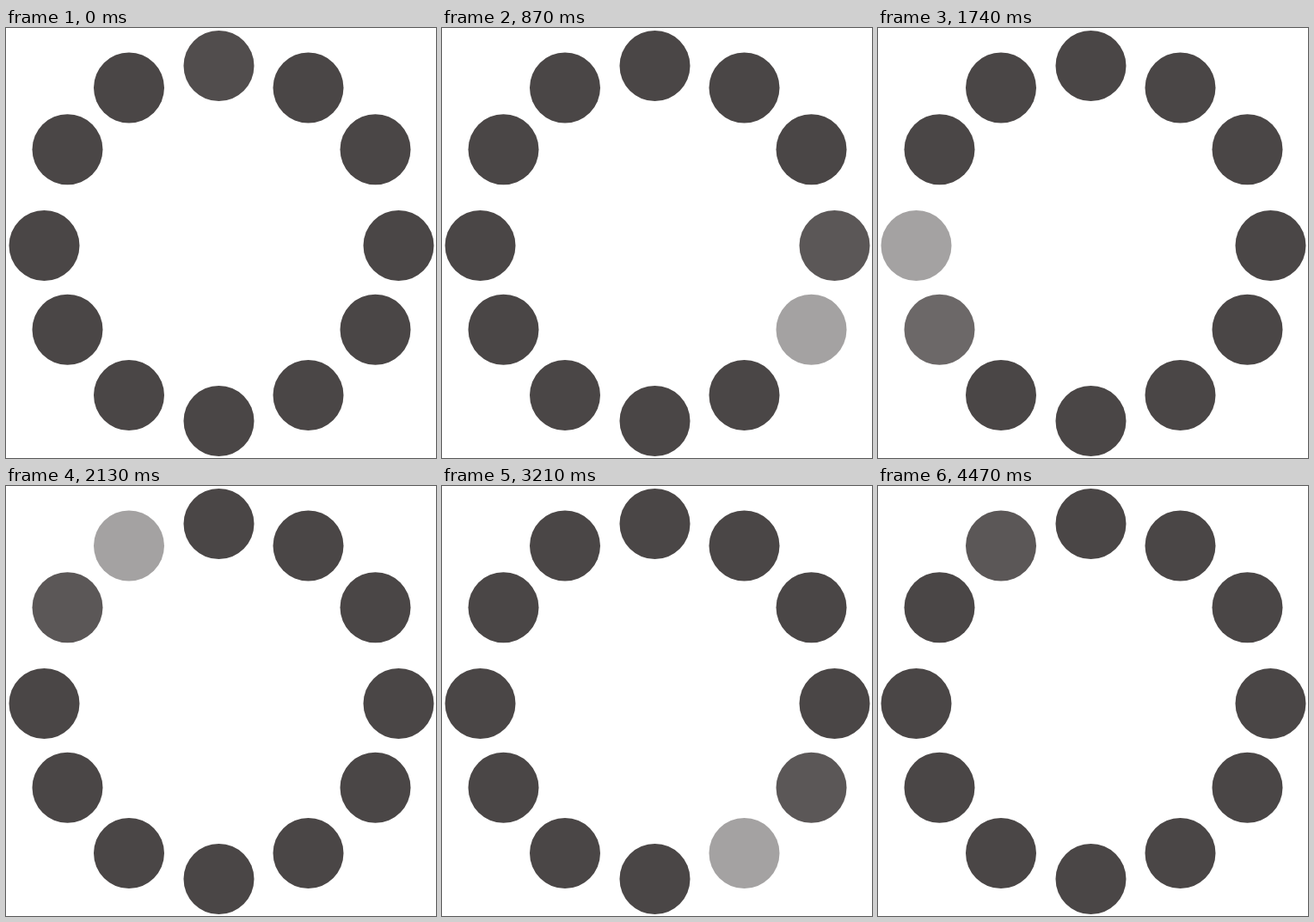
An HTML page for the animation above (4500 ms loop, 500 px wide and 500 px high).

```html
<!DOCTYPE html>
<html>
<head>
<meta charset="utf-8">
<style>
html, body { margin: 0; width: 100%; height: 100%; overflow: hidden; background: #fff; }
svg { display: block; width: 500px; height: 500px; fill: #4a4646; }
</style>
</head>
<body>
<svg id="ring" viewBox="0 0 500 500"></svg>
<script>
const LOOP = 4500, TICK = 30, COUNT = 12, LAG = 5, FADE = .19;

// One quarter of the ring, mirrored about each point's own middle.
const quarter = [
  { cx: 247.5, cy: 250.5, dx: 0, dy: 206.5 },
  { cx: 247.25, cy: 248.25, dx: 104.25, dy: 178.75 },
  { cx: 250.5, cy: 246, dx: 179, dy: 104.75 },
  { cx: 250.5, cy: 253, dx: 206, dy: 0 }
];

const ring = document.getElementById('ring');
const dots = Array.from({ length: COUNT }, (_, i) => {
  const { cx, cy, dx, dy } = quarter[Math.min(i % 6, 6 - i % 6)];
  const dot = document.createElementNS('http://www.w3.org/2000/svg', 'circle');
  dot.setAttribute('cx', i < 6 ? cx + dx : cx - dx);
  dot.setAttribute('cy', i < 3 || i > 9 ? cy - dy : cy + dy);
  dot.setAttribute('r', 41);
  return ring.appendChild(dot);
});

// Fade to half, hold, then return at half the speed.
function pulse(step, start) {
  const fadeStart = start ? start + 1 : -.23; // the very first fade is already under way
  const out = 1 - FADE * (step - fadeStart);
  const back = 1 - FADE / 2 * (start + 11 - step);
  return Math.min(1, Math.max(.5, out, back));
}

const t0 = performance.now();
function draw() {
  const tick = Math.floor((performance.now() - t0) % LOOP / TICK);
  const step = tick - Math.floor(tick / 6); // every sixth tick holds
  dots.forEach((dot, i) => {
    const opacity = Math.min(pulse(step, i * LAG), pulse(step, (i + COUNT) * LAG));
    dot.setAttribute('opacity', opacity);
  });
  requestAnimationFrame(draw);
}
draw();
</script>
</body>
</html>
```
